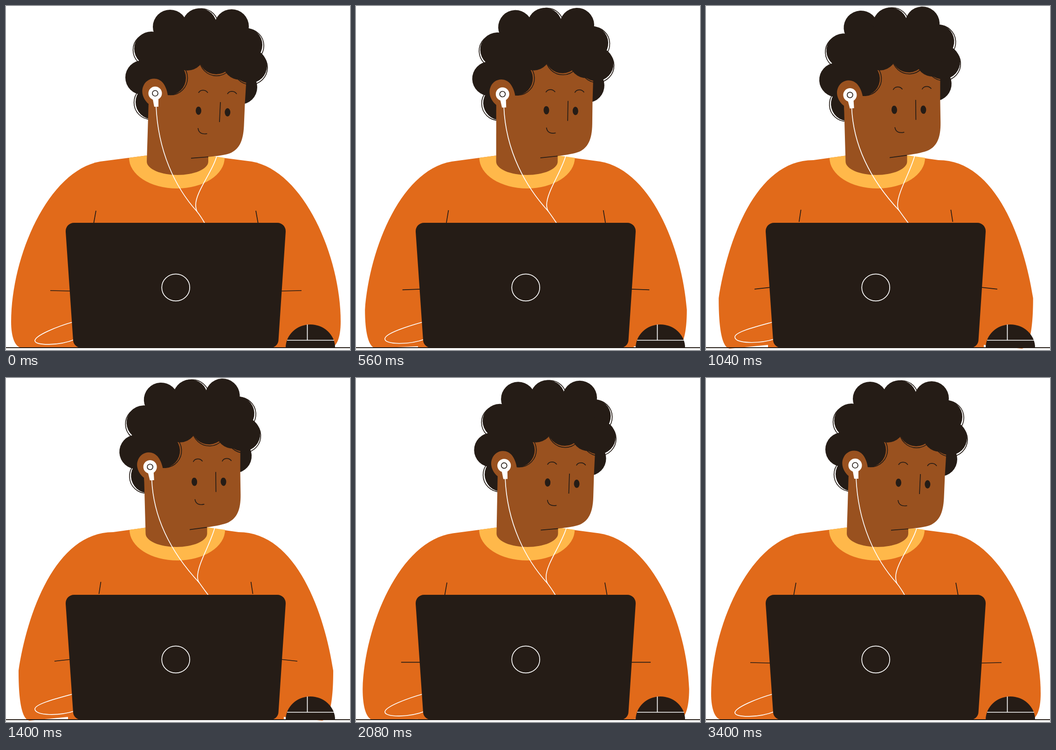
An HTML page with a canvas for the animation above (3.6 s loop, 738x741 px).

```html
<!DOCTYPE html>
<html lang="en">
<head>
<meta charset="utf-8">
<title>Working at a laptop</title>
<style>
html, body { margin: 0; width: 100%; height: 100%; overflow: hidden; background: #fff; }
canvas { display: block; width: 738px; height: 741px; }
</style>
</head>
<body>
<canvas id="stage" width="738" height="741"></canvas>
<script>
const c = document.getElementById('stage').getContext('2d');
const DARK = '#251c16', SKIN = '#99511f', SHIRT = '#e16a1a', COLLAR = '#ffb84a', WHITE = '#fff';
const LOOP = 3600, STEP = 40, TAU = Math.PI * 2;
const PIVOT = { x: 375, y: 378 };
const CURL = 37;

const clamp = v => Math.max(0, Math.min(1, v));
const ease = v => { v = clamp(v); return v * v * (3 - 2 * v); };
const bump = (t, mid, half) => clamp(1 - Math.abs(t - mid) / half);

function fill(d, color) {
  c.fillStyle = color;
  c.fill(new Path2D(d));
}
function stroke(d, color = DARK, width = 1.7) {
  c.strokeStyle = color;
  c.lineWidth = width;
  c.stroke(new Path2D(d));
}
function oval(x, y, rx, ry = rx) {
  c.beginPath();
  c.ellipse(x, y, rx, ry, 0, 0, TAU);
}
function disc(x, y, r, color) {
  oval(x, y, r);
  c.fillStyle = color;
  c.fill();
}
function ring(x, y, rx, ry = rx, color = DARK) {
  oval(x, y, rx, ry);
  c.strokeStyle = color;
  c.lineWidth = 1.7;
  c.stroke();
}

// Draws inside the head's tilted space
function tilted(a, paint) {
  c.save();
  c.translate(PIVOT.x, PIVOT.y);
  c.rotate(a);
  c.translate(-PIVOT.x, -PIVOT.y);
  paint();
  c.restore();
}
function tiltPoint(x, y, a) {
  const dx = x - PIVOT.x, dy = y - PIVOT.y, co = Math.cos(a), si = Math.sin(a);
  return [PIVOT.x + dx * co - dy * si, PIVOT.y + dx * si + dy * co];
}

// One half of the shirt; lean q pulls shoulder, elbow and cuff inwards
function halfShirt(q) {
  const x = 11 + 16 * q, elbow = 680 - 50 * q;
  const shoulder = `${202 + 28 * q} ${335 - 3 * q}`;
  const sleeve = `C${90 + 15 * q} ${355 - 23 * q} ${11 + 34 * q} ${540 - 30 * q} ${x} ${elbow}`;
  const cuff = `C${x} ${715 - 25 * q} ${20 + 13 * q} ${736 + 2 * q} ${34 + 18 * q} ${736 + 2 * q}`;
  fill(`M${shoulder}${sleeve}${cuff}L133 ${736 - 6 * q}V736H365V322H302Z`, SHIRT);
  stroke(`M${193 + 10.5 * q} ${441 - 2 * q}L${188 + 11.5 * q} ${469 - 4 * q}`);
  stroke(`M${95 + 9 * q} ${613 - 3 * q}L140 ${614 - 8 * q}`);
}

function shirt(q) {
  halfShirt(q);
  c.save();
  c.translate(729, 0);
  c.scale(-1, 1);
  halfShirt(q);
  c.restore();
  const x = 264 + q;
  fill(`M${x} 327L302 322H434L${x + 205} 327A102.5 66 0 0 1 ${x} 327Z`, COLLAR);
}

function neck(q, a) {
  const [x, y] = tiltPoint(306, 205, a), left = 302 - 2.5 * q;
  fill(`M${left} 335L${x} ${y}L${left + 132} 260V335A66 29 0 0 1 ${left} 335Z`, SKIN);
}

// Curl centres clockwise round the hair; a third value is the direction of its loose strand
const CURLS = [
  [352, 45], [415, 42, 0], [484, 44], [513, 84, 0.4], [523, 129, 1.2], [502, 122],
  [451, 110, 1.4], [389, 102], [349, 155, 0], [293, 154], [312, 92, 2.4]
];
const BACK_CURLS = [[315, 207, 2.9], [502, 175]];

function curls(list) {
  for (const [x, y, way] of list) {
    if (way !== undefined) ring(x + 4 * Math.cos(way), y + 4 * Math.sin(way), CURL - 0.5);
  }
  for (const [x, y] of list) disc(x, y, CURL, DARK);
}

function eye(x, y, shut) {
  c.save();
  c.beginPath();
  c.rect(x - 10, y - 9 + 18 * shut, 20, 20);
  c.clip();
  oval(x, y, 6, 9);
  c.fillStyle = DARK;
  c.fill();
  c.restore();
}
function brow(x, y) {
  stroke(`M${x - 10} ${y}C${x - 6} ${y - 7.5} ${x + 5} ${y - 7.5} ${x + 10} ${y}`);
}

function face(t) {
  fill('M306 211L345 120H518L512.5 210L510.5 258C509 293 499 309 481 317C470 321 455 323 434 325L397 328L306 250Z', SKIN);
  curls(CURLS);
  fill('M' + CURLS.map(([x, y]) => `${x} ${y}`).join('L') + 'Z', DARK);
  fill('M306 211C293 200 290 184 294 174C301 154 325 151 337 166C343 174 346 184 347 192L340 225H306Z', SKIN);

  const raise = 4.5 * ease(2 * bump(t, 1250, 400));
  brow(423, 187 - raise);
  brow(485, 189.5 - raise);
  const shut = bump(t, 390, 100);
  eye(413, 225.5, shut);
  eye(475.3, 229, shut);
  stroke('M460 207L458 250M412 263C413 273 420 277 431.5 275M397 327.8L434 325');

  disc(320, 188, 14.5, WHITE);
  fill('M314.5 199L318 217H327V199Z', WHITE);
  ring(320, 188, 6);
}

// Both wires meet at the same joint
const joint = q => ({ x: 410 + 5 * q, y: 443 - 1.5 * q });

function rightWire(q) {
  const { x, y } = joint(q), top = 453 - 4.5 * q, low = 407 + 4 * q;
  stroke(`M${top} 320C${top - 8} 354 ${low} 400 ${low} 428Q${low} 437 ${x} ${y}`, WHITE);
}
function leftWire(q, a) {
  const { x, y } = joint(q), [u, v] = tiltPoint(322, 215, a);
  stroke(`M${u} ${v}C${u + 4} ${v + 98} ${x - 47} 391 ${x} ${y}Q${x + 8} 453 ${x + 17 + 3 * q} 469`, WHITE);
}

function desk(q) {
  const y = 721 - 8 * q, low = 732 - 4 * q;
  stroke(`M146 680C110 690 62 ${y - 11} 62 ${y}C62 ${low} 115 ${low} 148 ${718 - q}`, WHITE);
  fill('M146 467H582A18 18 0 0 1 600 486L584.5 720A17 17 0 0 1 568 736H160A17 17 0 0 1 144 720L128 486A18 18 0 0 1 146 467Z', DARK);
  ring(364.2, 606.4, 30, 29, WHITE);
  fill('M600 736A53 50 0 0 1 706 736Z', DARK);
  stroke('M603 720H704M646.5 686V720', WHITE);
  stroke('M0 736H738', DARK, 2);
}

function draw(t) {
  const q = 1.03 * (ease(t / 1120) - ease((t - 1280) / 1120));
  const a = -0.058 * q;
  c.fillStyle = WHITE;
  c.fillRect(0, 0, 738, 741);
  shirt(q);
  rightWire(q);
  tilted(a, () => curls(BACK_CURLS));
  neck(q, a);
  tilted(a, () => face(t));
  leftWire(q, a);
  desk(q);
}

function frame(now) {
  draw(Math.floor(now % LOOP / STEP) * STEP);
  requestAnimationFrame(frame);
}
requestAnimationFrame(frame);
</script>
</body>
</html>
```
